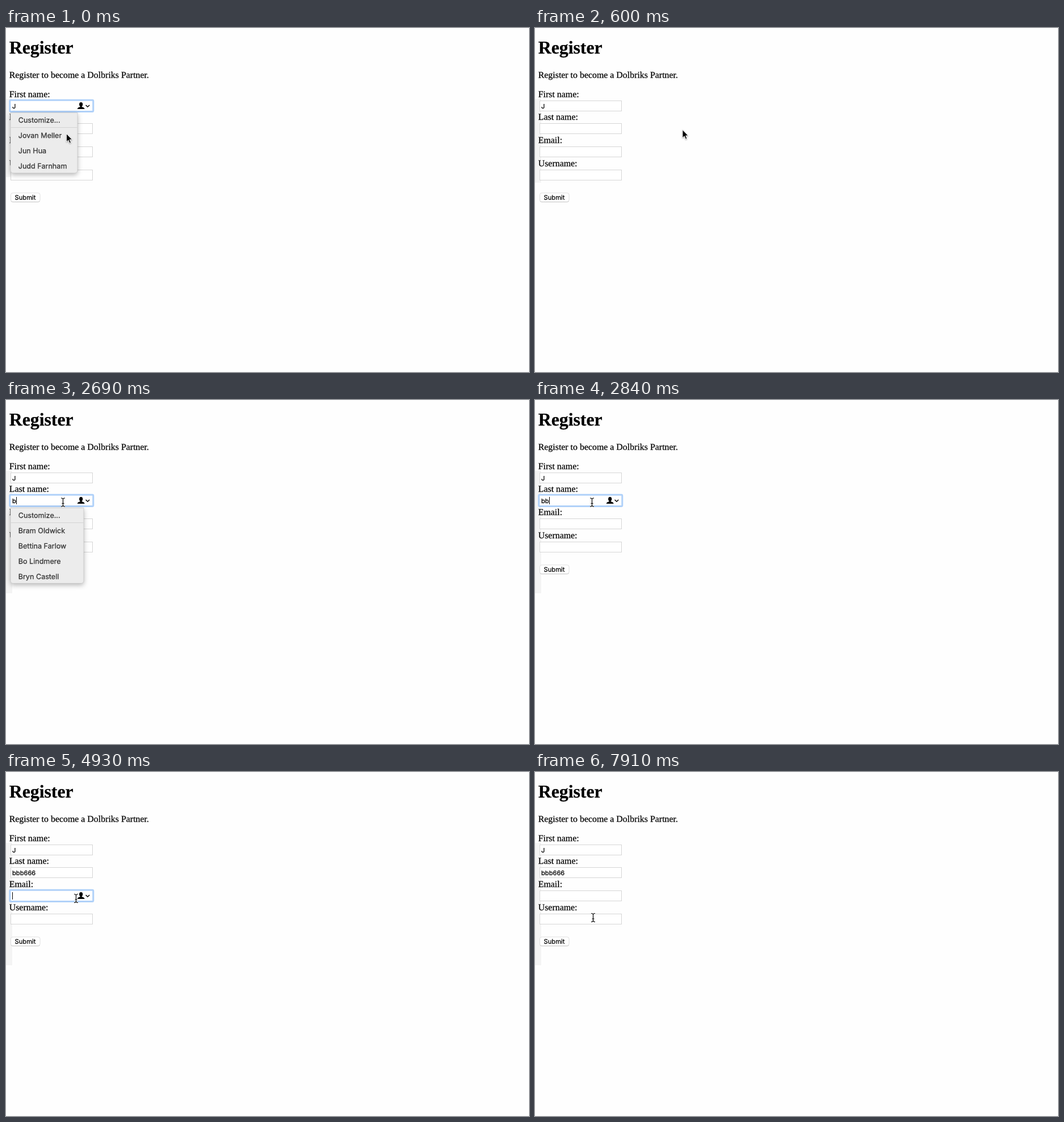
An HTML page that plays this animation: 922x607 px, repeating every 8000 ms.

```html
<!DOCTYPE html>
<html lang="en">
<head>
<meta charset="utf-8">
<title>Register</title>
<style>
  html, body { margin: 0; width: 100%; height: 100%; overflow: hidden; background: #fefefe; }
  svg { display: block; width: 922px; height: 607px; }
  text { stroke: #000; stroke-width: .25px; text-rendering: geometricPrecision; }
  .serif { font: 15.9px "Liberation Serif", Times, serif; }
  .title { font: bold 31.8px "Liberation Serif", Times, serif; }
  .field { font: 11px Inter, sans-serif; letter-spacing: .1px; }
  .button { font: 11.2px Inter, sans-serif; }
  .item { font: 12.6px Inter, sans-serif; fill: #333; stroke: #333; }
  .box { fill: #fff; stroke: #d6d6d6; }
  .ring { fill: #fff; stroke: #b0d1f9; stroke-width: 3; }
  .panel { fill: #ececec; stroke: #c0c0c0; stroke-width: .6;
    filter: drop-shadow(0 3px 4px rgba(0, 0, 0, .28)); }
  .arrow { fill: #000; stroke: #fff; stroke-width: 1;
    filter: drop-shadow(0 1px 1px rgba(0, 0, 0, .35)); }
</style>
</head>
<body>
<svg viewBox="0 0 922 607" xml:space="preserve">
  <rect id="strip" y="125" width="11" height="148" fill="#f4f4f4"/>
  <text class="title" x="5.7" y="45">Register</text>
  <text class="serif" x="5.7" y="88">Register to become a Dolbriks Partner.</text>
  <g id="form"></g>
  <rect x="8.5" y="292" width="51.5" height="15.5" rx="3.5" fill="#c9c9c9"/>
  <rect x="8.5" y="291" width="51.5" height="15.5" rx="3.5" fill="#fff" stroke="#d9d9d9" stroke-width=".8"/>
  <text class="button" x="34" y="303" text-anchor="middle">Submit</text>
  <g id="focus">
    <rect class="ring" x="6.8" y="-.8" width="147" height="20.4" rx="1.5"/>
    <ellipse cx="132.2" cy="6.7" rx="3.1" ry="3.8"/>
    <path d="M130.7 9h3v2.2q4.8 1 4.9 3.8h-12.8q.1-2.8 4.9-3.8z"/>
    <path d="M140.6 8l3.3 3.2 3.3-3.2" fill="none" stroke="#000" stroke-width="1.5"/>
    <rect id="caret" y="3" width="1" height="13"/>
  </g>
  <g id="values"></g>
  <g id="menus"></g>
  <path id="arrow" class="arrow" d="M0 0V14.5L3.3 11.4L5.7 16.8L8.1 15.8L5.8 10.5H10.2Z"/>
  <g id="beam" fill="none">
    <path id="bar" d="M-3.5-7.5Q0-7.5 0-5V5Q0 7.5-3.5 7.5M3.5-7.5Q0-7.5 0-5V5Q0 7.5 3.5 7.5M-2 2H2" stroke="#fff" stroke-width="2.6"/>
    <path d="M-3.5-7.5Q0-7.5 0-5V5Q0 7.5-3.5 7.5M3.5-7.5Q0-7.5 0-5V5Q0 7.5 3.5 7.5M-2 2H2" stroke="#000" stroke-width="1.2"/>
  </g>
</svg>
<script>
const LOOP = 8000;
const TOPS = [128, 168, 209, 250];
const LABELS = ["First name:", "Last name:", "Email:", "Username:"];
const $ = id => document.getElementById(id);

function add(parent, tag, attrs, text = "") {
  const el = document.createElementNS("http://www.w3.org/2000/svg", tag);
  for (const key in attrs) el.setAttribute(key, attrs[key]);
  el.textContent = text;
  return parent.appendChild(el);
}

function addMenu(top, width, names) {
  const menu = add($("menus"), "g", { transform: `translate(8 ${top})` });
  const height = 26.6 * (names.length + 1);
  add(menu, "path", {
    class: "panel",
    d: `M0 0H${width}V${height - 5}q0 5-5 5H5q-5 0-5-5z`
  });
  add(menu, "rect", { y: 25.5, width, height: 1, fill: "#d4d4d4" });
  ["Customize...", ...names].forEach((name, i) =>
    add(menu, "text", { class: "item", x: 13.7, y: 17.8 + 26.8 * i }, name));
  return menu;
}

LABELS.forEach((label, i) => {
  add($("form"), "text", { class: "serif", x: 5.7, y: TOPS[i] - 6 }, label);
  add($("form"), "rect", { class: "box", x: 8.5, y: TOPS[i] + .5, width: 144, height: 18 });
});
const [, lastName] = ["J", ""].map((value, i) =>
  add($("values"), "text", { class: "field", x: 11, y: TOPS[i] + 14 }, value));
const menus = [
  addMenu(149.5, 118, ["Jovan Meller", "Jun Hua", "Judd Farnham"]),
  addMenu(190.5, 129, ["Bram Oldwick", "Bettina Farlow", "Bo Lindmere", "Bryn Castell"])
];

// Each step changes only the listed properties; the others carry over.
const STEPS = [
  { t: 0, at: [106.5, 186.5], beam: false, focus: 0, caret: false, text: "", menu: 0, strip: 138 },
  { t: 150, at: [150, 184] },
  { t: 300, at: [215, 181] },
  { t: 450, at: [258, 180], menu: -1, strip: 148 },
  { t: 600, at: [260, 179.5], focus: -1 },
  { t: 750, at: [236, 179] },
  { t: 890, at: [172, 179] },
  { t: 1040, at: [112, 180], beam: true },
  { t: 1190, at: [100.5, 180.5], focus: 1, caret: true },
  { t: 1790, caret: false },
  { t: 2090, caret: true, text: "b" },
  { t: 2690, menu: 1, strip: 216 },
  { t: 2840, menu: -1, text: "bb" },
  { t: 2990, text: "bbb" },
  { t: 3440, caret: false },
  { t: 3740, caret: true, text: "bbb6" },
  { t: 3890, text: "bbb66" },
  { t: 4040, text: "bbb666" },
  { t: 4490, caret: false, at: [102, 184] },
  { t: 4640, at: [112, 213] },
  { t: 4790, at: [122, 237] },
  { t: 4930, at: [123.5, 223], focus: 2, caret: true },
  { t: 5380, caret: false },
  { t: 5830, caret: true },
  { t: 6430, caret: false },
  { t: 6880, caret: true },
  { t: 7030, at: [122, 232] },
  { t: 7180, at: [119, 243], focus: -1, caret: false },
  { t: 7310, at: [117, 252] },
  { t: 7460, at: [115, 256.5] },
  { t: 7910, at: [102.5, 257] }
];
const states = [];
STEPS.forEach((step, i) => states.push({ ...states[i - 1], ...step }));

const show = (el, on) => { el.style.display = on ? "" : "none"; };
const place = (el, x, y) => el.setAttribute("transform", `translate(${x} ${y})`);

function draw(s) {
  show($("arrow"), !s.beam);
  show($("beam"), s.beam);
  place($(s.beam ? "beam" : "arrow"), ...s.at);
  show($("focus"), s.focus >= 0);
  if (s.focus >= 0) place($("focus"), 0, TOPS[s.focus]);
  show($("caret"), s.caret);
  $("caret").setAttribute("x", 11 + (s.focus === 1 ? 7 * s.text.length : 0));
  lastName.textContent = s.text;
  menus.forEach((menu, i) => show(menu, s.menu === i));
  $("strip").setAttribute("height", s.strip);
}

const start = performance.now();
let current;
function tick() {
  const t = (performance.now() - start) % LOOP;
  const state = states.filter(s => s.t <= t).pop() || states[0];
  if (state !== current) draw(current = state);
  requestAnimationFrame(tick);
}
tick();
</script>
</body>
</html>
```
